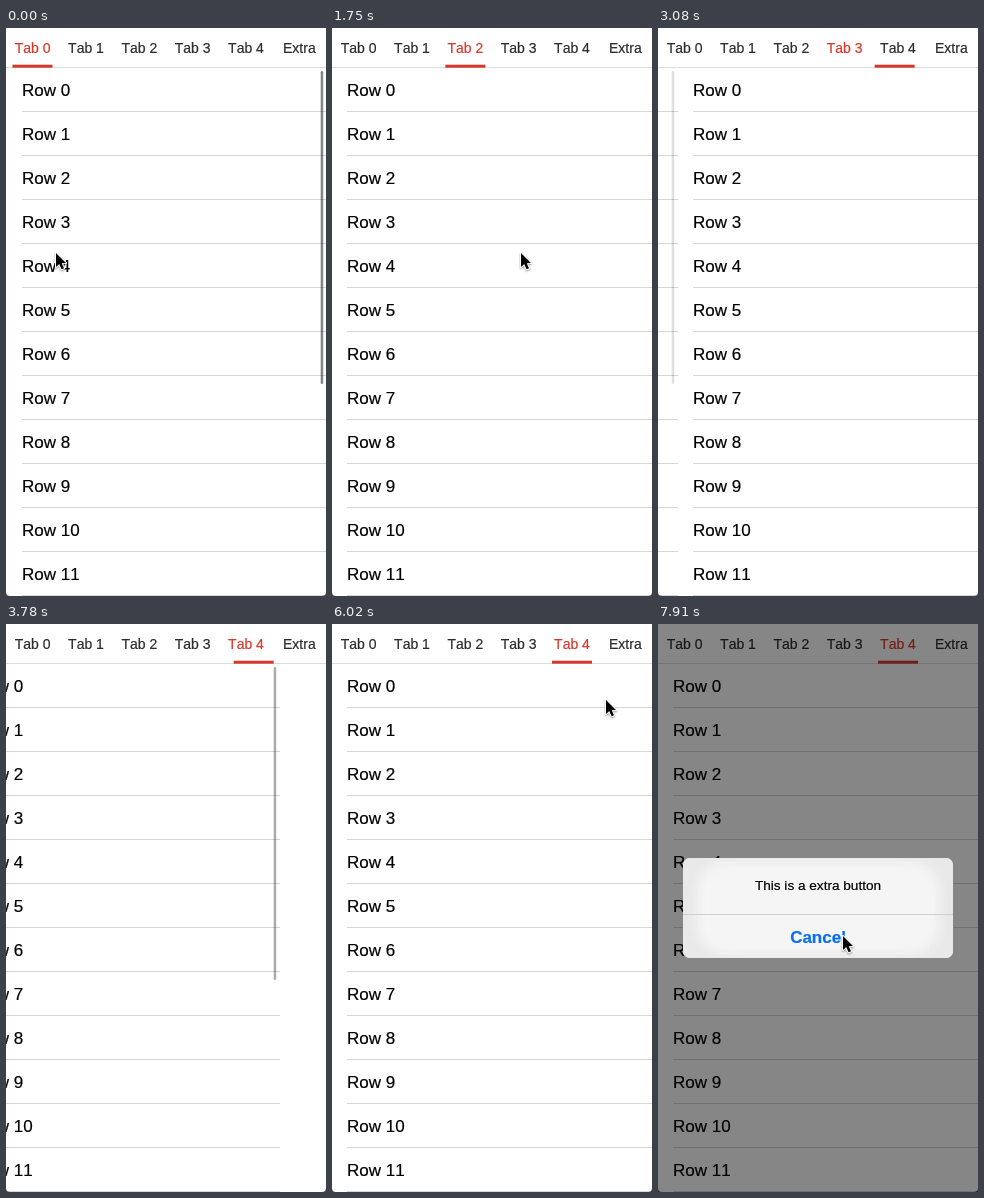
An HTML page with a canvas that plays this animation: 320 px wide and 568 px high, repeating every 8000 ms.

```html
<!DOCTYPE html>
<html lang="en">
<head>
<meta charset="utf-8">
<title>Tab pager</title>
<style>
  html, body { margin: 0; width: 100%; height: 100%; overflow: hidden; background: #fff; }
  canvas { display: block; width: 320px; height: 568px; }
</style>
</head>
<body>
<canvas id="stage"></canvas>
<script>
const W = 320, H = 568, LOOP = 8000, STEP = 70;
const TAB = W / 6, TOP = 40, ROW = 44;
const RED = '#d6382c';
const FONT = '"Liberation Sans", Arial, sans-serif';
const TABS = ['Tab 0', 'Tab 1', 'Tab 2', 'Tab 3', 'Tab 4', 'Extra'];

// Four page changes, then three pulls past the last page
const series = (n, first, gap) => Array.from({ length: n }, (_, i) => first + gap * i);
const SWIPES = series(4, 190, 815);
const PULLS = series(3, 3490, 920);
const SETTLE = 740, RELEASE = 190, ALERT = 6690;

// Cursor stops after the last pull: time, x, y
const STOPS = [
  [5540, 10, 275], [6020, 274, 76], [6300, 296, 16], [6440, 294, 23],
  [6960, 294, 23], [7490, 170, 290], [7910, 185, 312]
];

const canvas = document.getElementById('stage');
const ctx = canvas.getContext('2d');
const dpr = window.devicePixelRatio || 1;
canvas.width = W * dpr;
canvas.height = H * dpr;

const clamp = v => Math.max(0, Math.min(1, v));
const mix = (a, b, k) => a + (b - a) * k;
const smooth = k => k * k * (3 - 2 * k);

// Distance the pointer has dragged
const finger = t => 134 * Math.pow(Math.max(0, t) / 140, 1.3);

function swipe(t) {
  if (t <= 0) return 0;
  if (t >= SETTLE) return 1;
  return t < 200 ? 0.5 * Math.pow(t / 200, 1.6) : 1 - 0.5 * Math.exp((200 - t) / 117);
}

// Rubber band while held, critically damped spring afterwards
function pull(t) {
  const drag = finger(Math.min(t, RELEASE));
  const x = W * (1 - 1 / (drag * 0.55 / W + 1));
  const k = 0.015 * Math.max(0, t - RELEASE);
  return x * (1 + k) * Math.exp(-k);
}

function offsetAt(t) {
  if (t < 140) return -1;
  let x = 0;
  for (const s of SWIPES) x += W * swipe(t - s);
  for (const s of PULLS) x += pull(t - s);
  return Math.round(x);
}

// Enter from the left, rest at the grip point, then drag out again
function gesture(t, x, y) {
  return [mix(-20, x, clamp((t + 250) / 180)) - finger(t), y + 12 * Math.max(0, t) / 140];
}

function cursorAt(t) {
  if (t < STOPS[0][0]) {
    const near = s => t > s - 250 && t < s + 400;
    const s = SWIPES.find(near), p = PULLS.find(near);
    if (s) return gesture(t - s, 189, 225);
    return p ? gesture(t - p, 237, 257) : [-20, 0];
  }
  const i = Math.max(1, STOPS.findIndex(stop => stop[0] >= t));
  const [t0, x0, y0] = STOPS[i - 1], [t1, x1, y1] = STOPS[i];
  const k = smooth(clamp((t - t0) / (t1 - t0)));
  return [mix(x0, x1, k), mix(y0, y1, k)];
}

function barAlpha(page, t) {
  const age = t - (page ? SWIPES[page - 1] + SETTLE : -210);
  return 0.48 * clamp((age - 60) / 70) * clamp((590 - age) / 270);
}

function roundRect(x, y, w, h, r) {
  ctx.beginPath();
  ctx.roundRect(x, y, w, h, r);
  ctx.fill();
}

function text(str, x, y, font, color, align) {
  ctx.font = font + ' ' + FONT;
  ctx.fontKerning = 'none';
  ctx.fillStyle = ctx.strokeStyle = color;
  ctx.textAlign = align;
  ctx.lineWidth = 0.2;
  ctx.fillText(str, x, y);
  ctx.strokeText(str, x, y);
}

function drawPage(page, x, t) {
  for (let i = 0; i < 12; i++) {
    const y = TOP + i * ROW;
    text('Row ' + i, x + 15, y + 28, '17px', '#000', 'left');
    ctx.fillStyle = '#d6d6d8';
    ctx.fillRect(x + 15, y + 43, W - 15, 1);
  }
  const a = barAlpha(page, t);
  if (a > 0) {
    ctx.fillStyle = `rgba(0,0,0,${a})`;
    roundRect(x + 313.7, 43, 2.5, 313, 1.25);
  }
}

function drawTabs(off, t) {
  const active = SWIPES.filter(s => t >= s + SETTLE).length;
  ctx.fillStyle = '#fff';
  ctx.fillRect(0, 0, W, TOP);
  ctx.fillStyle = '#dcdcdc';
  ctx.fillRect(0, 39, W, 1);
  TABS.forEach((name, i) =>
    text(name, TAB * (i + 0.5), 25, '14px', i === active ? RED : '#2b2b2b', 'center'));
  ctx.fillStyle = RED;
  ctx.fillRect(6.67 + off / 6, 36.7, 40, 3);
}

function drawCorners() {
  ctx.fillStyle = '#444';
  for (const side of [0, 1]) {
    ctx.save();
    ctx.translate(side * W, H);
    ctx.scale(side ? -1 : 1, -1);
    ctx.beginPath();
    ctx.moveTo(0, 0);
    ctx.lineTo(4, 0);
    ctx.quadraticCurveTo(0, 0, 0, 4);
    ctx.fill();
    ctx.restore();
  }
}

function drawAlert(t) {
  if (t <= 0) return;
  const rest = Math.exp(-t / 100), solid = clamp((t - 250) / 400);
  const zoom = 1 + 0.2 * rest;
  ctx.fillStyle = `rgba(0,0,0,${0.475 * (1 - rest)})`;
  ctx.fillRect(0, 0, W, H);

  ctx.save();
  ctx.translate(W / 2, 284);
  ctx.scale(zoom, zoom);
  ctx.translate(-W / 2, -284);
  ctx.globalAlpha = clamp(t / 150);
  ctx.fillStyle = 'rgba(246,246,246,0.92)';
  roundRect(25, 234, 270, 100, 7);
  if (solid > 0) {
    ctx.save();
    ctx.globalAlpha = solid;
    ctx.fillStyle = '#e9e9e9';
    roundRect(25, 234, 270, 100, 7);
    ctx.clip();
    ctx.filter = `blur(${6 * dpr}px)`;
    ctx.fillStyle = '#f5f5f5';
    roundRect(39, 238, 242, 92, 28);
    ctx.restore();
  }
  ctx.fillStyle = '#cfcfd1';
  ctx.fillRect(25, 290, 270, 1);
  text('This is a extra button', W / 2, 266.5, '13.6px', '#000', 'center');
  text('Cancel', W / 2, 319, 'bold 17px', '#0a6fec', 'center');
  ctx.restore();
}

function drawCursor(x, y) {
  if (x < -14) return;
  const shape = [[0, 0], [0, 14], [3.2, 11], [5.6, 16.3], [8, 15.3], [5.7, 10.2], [10, 10]];
  ctx.save();
  ctx.translate(Math.round(x), Math.round(y));
  ctx.beginPath();
  for (const point of shape) ctx.lineTo(...point);
  ctx.closePath();
  ctx.lineJoin = 'round';
  ctx.lineWidth = 2;
  ctx.strokeStyle = '#fff';
  ctx.shadowColor = 'rgba(0,0,0,0.4)';
  ctx.shadowBlur = 2 * dpr;
  ctx.shadowOffsetY = dpr;
  ctx.stroke();
  ctx.shadowColor = 'transparent';
  ctx.fillStyle = '#000';
  ctx.fill();
  ctx.restore();
}

function draw(t) {
  ctx.setTransform(dpr, 0, 0, dpr, 0, 0);
  ctx.fillStyle = '#fff';
  ctx.fillRect(0, 0, W, H);
  const off = offsetAt(t);
  for (let page = 0; page < 5; page++) {
    const x = page * W - off;
    if (x > -W && x < W) drawPage(page, x, t);
  }
  drawTabs(off, t);
  drawCorners();
  drawAlert(t - ALERT);
  drawCursor(...cursorAt(t));
}

const start = performance.now();
function tick() {
  const t = (performance.now() - start) % LOOP;
  draw(Math.min(7910, Math.floor(t / STEP) * STEP));
  requestAnimationFrame(tick);
}
tick();
</script>
</body>
</html>
```
